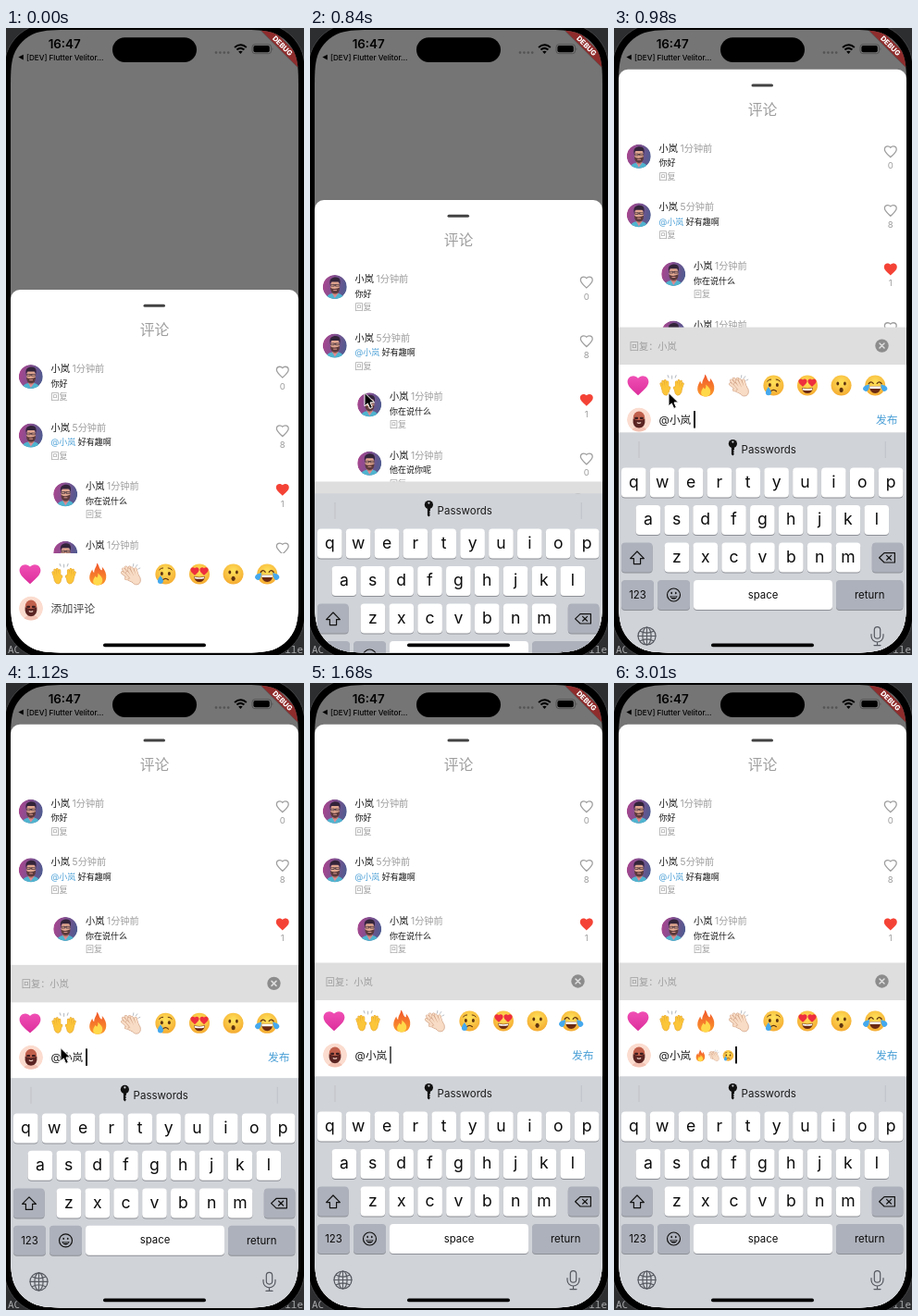
Write an HTML page that moves like this. It is 322 by 678 pixels and loops after 3.5 s.

```html
<!DOCTYPE html>
<html lang="zh-CN">
<head>
<meta charset="utf-8">
<title>Comments sheet</title>
<style>
html, body { margin: 0; width: 100%; height: 100%; overflow: hidden; background: #000; }
svg { display: block; width: 322px; height: 678px; }
text { font-family: Inter, "Noto Sans CJK SC", "Noto Sans CJK", "Noto Sans CJK JP", sans-serif; white-space: pre; }
.mono { font-family: "Noto Sans Mono", monospace; font-size: 11px; fill: #a9abad; }
</style>
</head>
<body>
<svg id="stage" viewBox="0 0 322 678" xmlns="http://www.w3.org/2000/svg"></svg>
<script>
const LOOP = 3500, STEP = 70;
const USER = '小岚';
const GREY = '#9e9e9e', BLUE = '#4a9fd6', INK = '#161616';
const HEART = 'M12 21.35l-1.45-1.32C5.4 15.36 2 12.28 2 8.5 2 5.42 4.42 3 7.5 3c1.74 0 3.41.81 4.5 2.09C13.09 3.81 14.76 3 16.5 3 19.58 3 22 5.42 22 8.5c0 3.78-3.4 6.86-8.55 11.54z';

// y is the optical middle of the line
const text = (x, y, size, str, fill = INK, more = '') =>
  `<text x="${x}" y="${(y + size * 0.37).toFixed(2)}" font-size="${size}" fill="${fill}" ${more}>${str}</text>`;
const mid = (x, y, size, str, fill, more = '') => text(x, y, size, str, fill, 'text-anchor="middle" ' + more);
const rect = (x, y, w, h, fill, r = 0) =>
  `<rect x="${x}" y="${y}" width="${w}" height="${h}" rx="${r}" fill="${fill}"/>`;
const circle = (x, y, r, fill) => `<circle cx="${x}" cy="${y}" r="${r}" fill="${fill}"/>`;
const oval = (x, y, rx, ry, fill) => `<ellipse cx="${x}" cy="${y}" rx="${rx}" ry="${ry}" fill="${fill}"/>`;
const path = (d, fill, more = '') => `<path d="${d}" fill="${fill}" ${more}/>`;
const line = (d, color, w = 1) =>
  path(d, 'none', `stroke="${color}" stroke-width="${w}" stroke-linecap="round" stroke-linejoin="round"`);
const group = (tf, body, id = '') => `<g ${id && `id="${id}"`} transform="${tf}">${body}</g>`;
const use = (id, x, y, s = 1) => `<use href="#${id}" transform="translate(${x} ${y}) scale(${s})"/>`;
const gradient = (id, a, b, dir = 'x1="0" y1="0" x2="0" y2="1"') =>
  `<linearGradient id="${id}" ${dir}><stop stop-color="${a}"/><stop offset="1" stop-color="${b}"/></linearGradient>`;

// Rounded rectangle whose corners ease into the sides
function smoothRect(x0, y0, x1, y1, r) {
  const half = [[1.529, 0], [1.088, 0], [0.868, 0], [0.631, 0.075], [0.373, 0.169]];
  const arc = [...half, ...half.map(([a, b]) => [b, a]).reverse()];
  const corner = (x, y, sx, sy, flip) => (flip ? [...arc].reverse() : arc)
    .map(([a, b]) => `${x + sx * a * r} ${y + sy * b * r}`);
  const corners = [corner(x1, y0, -1, 1), corner(x1, y1, -1, -1, true),
    corner(x0, y1, 1, -1), corner(x0, y0, 1, 1, true)];
  return corners.map(([first, ...rest], i) => (i ? 'L' : 'M') + first + 'C' + rest.join(' ')).join('') + 'z';
}

// Emoji, about 22 px wide around the origin
const face = body => circle(0, 0, 11, 'url(#yellow)') + body;
const brown = '#5f3410';
const loveHeart = x => group(`translate(${x} -3) scale(.46) translate(-12 -12)`, path(HEART, '#ee2f3e'));
const tear = (x, y, a) => group(`translate(${x} ${y}) rotate(${a})`,
  path('M0-4.5C2-1.5 3 0 3 1.6A3 3 0 0 1-3 1.6C-3 0-2-1.5 0-4.5z', '#45a9ee'));
const hand = (skin, edge) => {
  const fingers = 'M-3-1L-4-7M-1-2V-9M1.5-2L2.2-8.5M3.5 0L5-6M-3 3L-5.4 0';
  return line(fingers, edge, 3.2) + path('M-4.5-2H4.8V4Q3.5 8.5 0 8.5Q-4 8-4.5 3z', skin, `stroke="${edge}" stroke-width=".6"`) +
    line(fingers, skin, 2.3);
};
const raised = hand('#fcc63a', '#e0a030'), pale = hand('#f8dcc5', '#cf9f83');
const emoji = {
  heart: group('scale(1.14) translate(-12 -12)', path(HEART, 'url(#pink)')),
  praise: group('translate(-7 3) rotate(-8) scale(-.82 .9)', raised) +
    group('translate(7 3) rotate(8) scale(.82 .9)', raised) +
    line('M0-10.5V-7.5M-4.5-11L-3.6-8.6M4.5-11L3.6-8.6', '#b9bec4', 1.1),
  fire: path('M-1-12C2-9 1-6 4-4C5-5 5-6 4.5-8C8-4 9.5 0 9 4C8.5 9 5 12 0 12C-6 12-9 8-9 3.5C-9 0-7-3-6-5C-5.5-3-5-2-4-1.5C-4-6-1-8-1-12z', 'url(#flame)') +
    path('M0-1C3 2 5.5 4 5 7.5C4.5 10.5 2.5 12 0 12C-3.5 12-5.5 10-5 7C-4.6 4.6-3 4-3 2C-2 3-1.5 3.5-1 4C0 3 .5 1 0-1z', '#ffd94a'),
  clap: group('translate(-2 1) rotate(-42) scale(1.05)', pale) +
    group('translate(2.6 3) rotate(-30) scale(1.08)', pale) +
    line('M2-11L1.6-8.5M6-10L4.6-8M9-6.5L7-5.4', '#b9bec4', 1),
  cry: face(oval(-4, -.5, 1.5, 2, brown) + oval(4, -.5, 1.5, 2, brown) +
    line('M-3 6.2Q0 3.4 3 6.2', brown, 1.2) + line('M-6.8-4.6Q-5-6.8-2.8-6.6M6.8-4.6Q5-6.8 2.8-6.6', brown, 1) + tear(-5.5, 6, 0)),
  love: face(loveHeart(-5) + loveHeart(5) + path('M-6 2.5Q0 4 6 2.5Q5 8.5 0 8.5T-6 2.5z', '#6b2a12') +
    path('M-5.4 3Q0 4.3 5.4 3L5 4.8Q0 5.8-5 4.8z', '#fff')),
  wow: face(oval(-3.8, -2, 1.4, 2, brown) + oval(3.8, -2, 1.4, 2, brown) + oval(0, 4.8, 2.1, 2.6, brown)),
  joy: face(line('M-7-2Q-4.5-5.5-2-2.2M7-2Q4.5-5.5 2-2.2', brown, 1.3) +
    path('M-6.2 1H6.2Q5.5 8.5 0 8.5T-6.2 1z', '#6b2a12') + path('M-6 1H6L5.6 3.4H-5.6z', '#fff') +
    tear(-9, 2, 40) + tear(9, 2, -40))
};

const defs = `<defs>
  <radialGradient id="yellow" cx=".5" cy=".35" r=".7"><stop stop-color="#ffe25a"/><stop offset="1" stop-color="#f4a72e"/></radialGradient>
  ${gradient('pink', '#f04fb4', '#dc2f9c')}${gradient('flame', '#f0552b', '#fb9a2c')}
  ${gradient('backdrop', '#a8468f', '#4d5c90', 'x1="0" y1=".4" x2="1" y2=".6"')}
  <clipPath id="screen"><path d="${smoothRect(5, 2, 316, 675.5, 43.5)}"/></clipPath>
  <clipPath id="disc"><circle r="13"/></clipPath>
  ${Object.entries(emoji).map(([id, body]) => `<g id="${id}">${body}</g>`).join('')}
  <g id="man" clip-path="url(#disc)">${circle(0, 0, 13, 'url(#backdrop)')}
    ${path('M-10 14Q-9 8-3 7H4Q9 8 10 14z', '#4fb4cf')}${path('M-3 6.5L0 12L4 6.5z', '#e08a96')}
    ${rect(-2.5, 3, 5.5, 5.5, '#b87868', 2)}${oval(.3, -1, 5, 6.2, '#e0a68f')}
    ${path('M-5-2.5C-6.5-8.5-3-10.5 1-10.5C6-10.5 6.5-6 5.4-2.5L4.4-5.6H-3.8z', '#33243a')}
    ${path('M-4.8.4Q-3 2.2 0 2T5.3.4Q5.4 7 .3 7.2Q-4.8 7-4.8.4z', '#5c3a3c')}
    ${line('M-4.4-2.6H-.6V-.8H-3.8zM1.2-2.6H5V-.8H1.2zM-.6-2.2H1.2', '#3a2a38', .7)}${line('M-1.2 3.6H1.8', '#d9958c', 1)}</g>
  <g id="me" clip-path="url(#disc)">${circle(0, 0, 13, '#fbdccf')}
    ${path('M-9 14Q-7 8-2 8H3Q8 8 9 14z', '#f3c1b2')}${oval(0, -2.2, 6.2, 6.8, '#c0604c')}
    ${path('M-6.4-1.2Q0 2 6.4-1.2Q7.4 8.2 0 8.8Q-7.4 8.2-6.4-1.2z', '#5a2422')}
    ${rect(-4.8, -2.8, 3.9, 2.2, '#3c1c1e', 1)}${rect(.9, -2.8, 3.9, 2.2, '#3c1c1e', 1)}
    ${line('M-1.8 3.2Q0 4.4 1.8 3.2', '#f5d4c8', 1.1)}</g>
</defs>`;

function comment(i, x, time, body, likes, liked) {
  const heart = liked ? path(HEART, '#f44336')
    : path(HEART, 'none', `stroke="${GREY}" stroke-width="2"`);
  return group(`translate(0 ${63.6 * i})`,
    use('man', x - 21.8, 94) +
    text(x, 85.4, 10.2, USER) + text(x + 23, 85.4, 10.2, time + '分钟前', GREY) +
    text(x, 101.3, 9, body) + text(x, 115.6, 9, '回复', GREY) +
    group(`translate(298.8 89) scale(${liked ? 0.7 : 0.64}) translate(-12 -12)`, heart) +
    mid(298.8, 104, 9.6, likes, GREY));
}

const sheet = rect(5, 0, 311, 700, '#fff', 10) + rect(148.5, 15.7, 23.5, 3, '#424242', 1.5) +
  mid(160.5, 43.5, 15.8, '评论', GREY) +
  comment(0, 48.6, 1, '你好', 0) +
  comment(1, 48.6, 5, `<tspan fill="${BLUE}">@${USER}</tspan> 好有趣啊`, 8) +
  comment(2, 86, 1, '你在说什么', 1, true) +
  comment(3, 86, 1, '他在说你呢', 0);

const typedEmoji = ['fire', 'clap', 'cry'];
const footer = rect(5, 343, 311, 340, '#fff') +
  `<g id="bar">${rect(5, 302.5, 311, 40.5, '#dedede')}${text(16.8, 323, 10.2, '回复：' + USER, GREY)}
    ${circle(289.5, 322.5, 7.2, '#8c8c8c')}${line('M287 320L292 325M292 320L287 325', '#dedede', 1.5)}</g>` +
  Object.keys(emoji).map((id, i) => use(id, 26 + 36.6 * i, 365.5)).join('') +
  use('me', 27, 402.5) +
  `<g id="hint">${text(48.6, 402.5, 11.9, '添加评论', '#444')}</g>
   <g id="draft">${text(48.6, 402.5, 11.7, '@' + USER)}
    ${typedEmoji.map((id, i) => `<g id="typed${i}">${use(id, 93.4 + 15 * i, 402.8, 0.53)}</g>`).join('')}
    <rect id="caret" y="393" width="2" height="18.5" fill="#111"/>
    ${text(283, 402.5, 11.8, '发布', BLUE)}</g>`;

const key = (x, y, w, fill, label = '', size = 18, dy = 0) =>
  rect(x, y + 1, w, 32, '#8d9096', 4) + rect(x, y, w, 32, fill, 4) +
  mid(x + w / 2, y + 16 + dy, size, label, '#0c0c0c');
const keyRow = (letters, x, y) =>
  [...letters].map((c, i) => key(x + 30.86 * i, y, 26.6, '#fff', c, 17.6, -1.4)).join('');
const DIM = '#adb1bb', ICON = '#565960', TRAY = '#d0d3d8';

const keyboard = rect(0, 425.3, 322, 260, TRAY) +
  rect(26.6, 435, 0.8, 18, '#bbbec5') + rect(292.8, 435, 0.8, 18, '#bbbec5') +
  `<g id="suggest">${circle(128.4, 437.6, 4.6, '#111')}${circle(128.4, 435.6, 1.1, TRAY)}
    ${path('M126.9 441H130V444L128.9 445L130 446.2L128.9 447.6L130 448.6L128.4 450.6L126.9 449z', '#111')}
    ${text(137.6, 443.5, 11.5, 'Passwords', '#1a1a1a')}</g>` +
  keyRow('qwertyuiop', 8, 463.6) + keyRow('asdfghjkl', 23.6, 504) + keyRow('zxcvbnm', 54.6, 544.6) +
  key(8, 544.6, 33.6, DIM) +
  line('M25 554L32.4 561.6H28.6V567.6H21.4V561.6H17.6z', '#111', 1.2) +
  key(278.8, 544.6, 33.6, DIM) +
  line('M286.6 560.8L292 555.6H303.4V566H292zM294.6 558.4L299.6 563.2M299.6 558.4L294.6 563.2', '#111', 1.2) +
  key(8, 585, 35, DIM, '123', 11.4) + key(47, 585, 35, DIM) +
  `<circle cx="64.5" cy="601" r="7" fill="none" stroke="#111" stroke-width="1.2"/>` +
  oval(62.2, 599, .8, 1.2, '#111') + oval(66.8, 599, .8, 1.2, '#111') +
  path('M60.4 602.2H68.6Q67.6 605.6 64.5 605.6T60.4 602.2z', '#111') + rect(61.6, 602.7, 5.8, 1, DIM) +
  key(86, 585, 150, '#fff', 'space', 11.4, -.6) + key(240, 585, 72.4, DIM, 'return', 11.4) +
  line('M26 645.5H45M35.5 636V655M28.3 640.2Q35.5 644 42.7 640.2M28.3 650.8Q35.5 647 42.7 650.8', ICON, 1.1) +
  `<g fill="none" stroke="${ICON}" stroke-width="1.2"><circle cx="35.5" cy="645.5" r="9.5"/>
    <ellipse cx="35.5" cy="645.5" rx="4.6" ry="9.5"/><rect x="281.3" y="635.6" width="6.4" height="12.6" rx="3.2"/></g>` +
  line('M278 643.5V645.5A6.5 6.5 0 0 0 291 645.5V643.5M284.5 652V655.6M281 655.6H288', ICON, 1.2);

const status = mid(63.2, 17.4, 13.4, '16:47', '#000', 'font-weight="600"') +
  path('M13.4 31.6L18.8 28.8V34.4z', '#000') +
  text(22, 31.6, 8.1, '[DEV] Flutter Velitor...', '#000', 'font-weight="500"') +
  [0, 1, 2, 3].map(i => circle(227 + 4.4 * i, 26.6, 1.3, '#545454')).join('') +
  path('M253.4 28L251.2 25.6Q253.4 23.8 255.6 25.6z', '#000') +
  path('M249.4 23.6Q253.4 20.2 257.4 23.6M247 20.9Q253.4 15.6 259.8 20.9', 'none', 'stroke="#000" stroke-width="2"') +
  `<rect x="266" y="17.7" width="20.6" height="10" rx="3" fill="none" stroke="#4c4c4c" stroke-width=".8"/>` +
  rect(267.4, 19.1, 17.4, 7.2, '#000', 2) + path('M287.6 21Q289.4 22.7 287.6 24.4z', '#4c4c4c');

const island = rect(115, 10.3, 91, 26.6, '#000', 13.3);
const banner = group('translate(316 2) rotate(45)',
  rect(-40, 19, 80, 10.6, '#0004') + rect(-40, 19.4, 80, 9.6, '#8f2c2c') +
  mid(0, 24.2, 7.7, 'DEBUG', '#fff', 'font-weight="800"'));
const pointer = path('M0 0V14.4L3.3 11.4L5.7 17L8.4 15.8L6 10.4H10.6z', '#000', 'stroke="#fff" stroke-width="1" stroke-linejoin="round"');

const stage = document.getElementById('stage');
stage.innerHTML = defs + rect(0, 0, 322, 678, '#2d2e30') +
  `<text class="mono" x="2" y="676">AC</text><text class="mono" x="321" y="676" text-anchor="end">ile</text>` +
  path(smoothRect(-3, -6, 324, 683.5, 51.5), '#000', 'stroke="#414244"') +
  `<g clip-path="url(#screen)">${rect(0, 0, 322, 678, '#757575')}${status}
    ${group('', sheet, 'sheet')}${group('', footer, 'footer')}${group('', keyboard, 'keyboard')}
    ${rect(105, 665.6, 111, 3.6, '#000', 1.8)}${banner}</g>` + island +
  group('translate(59 394.5)', pointer, 'pointer');

const $ = id => document.getElementById(id);
const show = (id, on) => $(id).setAttribute('opacity', +on);
const move = (id, y) => $(id).setAttribute('transform', `translate(0 ${y.toFixed(2)})`);
const smooth = x => { x = Math.min(1, Math.max(0, x)); return x * x * (3 - 2 * x); };
// distance left to travel, decaying after start
const settle = (t, dist, start, tau) => t > 1190 ? 0 : dist * Math.exp(-Math.max(0, t - start) / tau);

const TYPED = [2030, 2380, 2800];

function draw(time) {
  const t = Math.floor(time / STEP) * STEP;
  const replying = t >= 770;
  move('sheet', 283 - 238.3 * smooth((t - 731) / 249));
  move('footer', settle(t, 225, 828.5, 64));
  move('keyboard', settle(t, 253, 752, 74.8));
  show('keyboard', replying);
  show('bar', replying);
  show('draft', replying);
  show('hint', !replying);
  show('pointer', t >= 700 && t < 1330);

  const count = TYPED.filter(at => t >= at).length;
  TYPED.forEach((at, i) => show('typed' + i, t >= at));
  $('caret').setAttribute('x', 86 + 15 * count);
  show('caret', t >= 1680 && t < 1960 ? Math.max(0, (1820 - t) / 210) : 1);
  show('suggest', TYPED.some(at => t >= at && t < at + 140) ? 0.8 : 1);
}

const start = performance.now();
function tick() {
  draw((performance.now() - start) % LOOP);
  requestAnimationFrame(tick);
}
tick();
</script>
</body>
</html>
```
